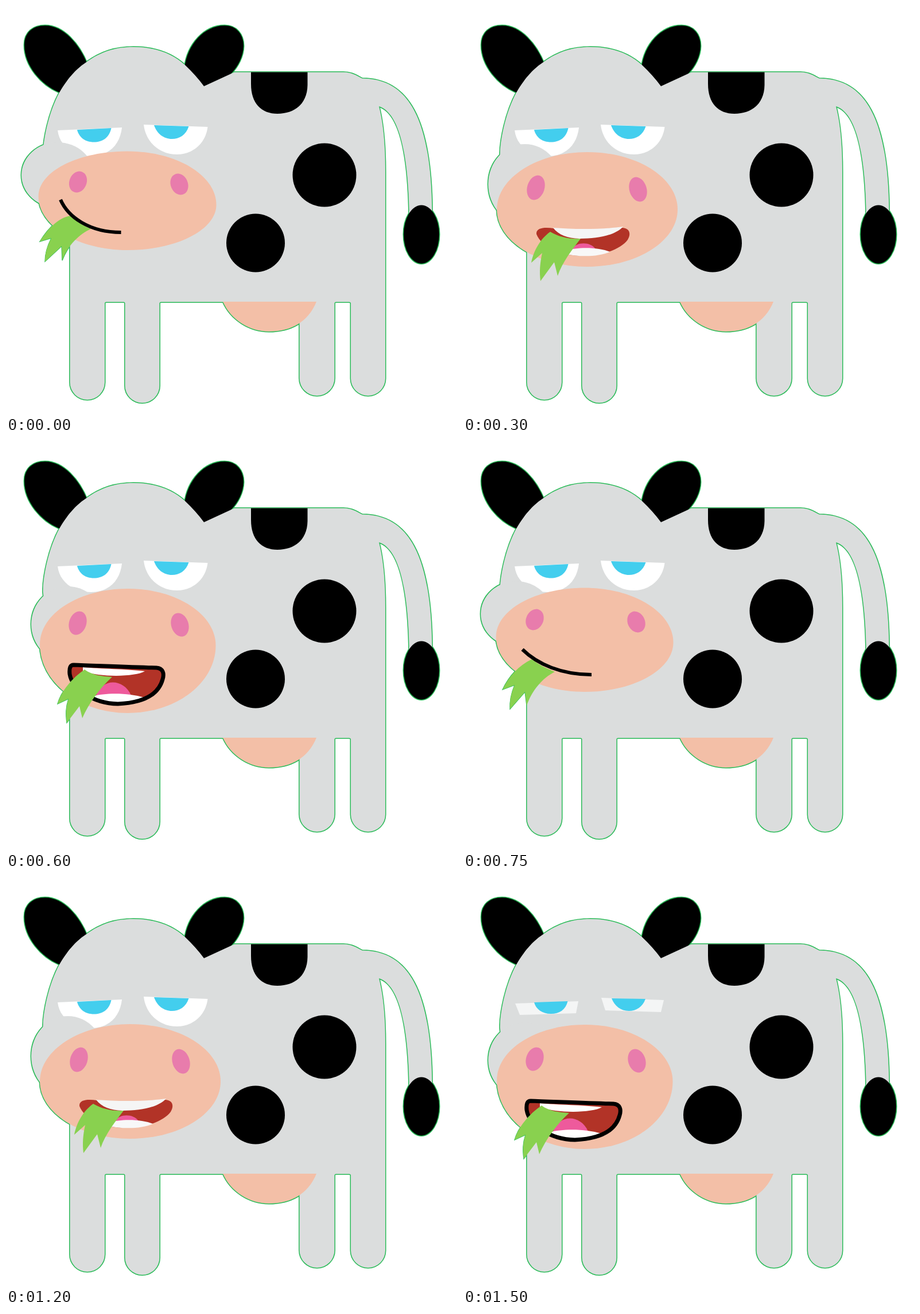
These frames come from a looping animation (786 by 712 pixels, 1.65 s). An HTML page:

```html
<!DOCTYPE html>
<html lang="en">
<head>
<meta charset="utf-8">
<title>Chewing cow</title>
<style>
  html, body { margin: 0; width: 100%; height: 100%; overflow: hidden; background: #fff; }
  svg { display: block; width: 786px; height: 712px; }
</style>
</head>
<body>
<svg id="stage" viewBox="0 0 786 712" xmlns="http://www.w3.org/2000/svg"></svg>
<script>
const GREY = '#dbdddd', PEACH = '#f3bfa7', PINK = '#e87cac', BLUE = '#43ceee',
      RED = '#b23327', LEAF = '#89d14f', EDGE = '#2abb58', TONGUE = '#ee5a9c';
const STEP = 150, LOOP = 1650;

const path = (d, fill) => `<path d="${d}" fill="${fill}"/>`;
const oval = (x, y, rx, ry, fill, turn = 0) =>
  `<ellipse cx="${x}" cy="${y}" rx="${rx}" ry="${ry}" fill="${fill}" transform="rotate(${turn} ${x} ${y})"/>`;
const leg = (l, r, bottom) => {
  const rad = (r - l) / 2;
  return `V${bottom - rad} A${rad},${rad} 0 0 1 ${l},${bottom - rad}`;
};

const ears =
  path('M93,151 C62,138 32,105 32,68 C32,45 48,34 68,34 C100,34 128,66 142,102 L130,140Z', '#000') +
  path('M311,108 C316,66 346,34 381,34 C402,34 414,50 414,70 C413,106 378,142 343,140Z', '#000');

const torso = path(
  'M64.5,262 C64,236 74,186 93,151 C110,122 125,108 140,98 C165,80 190,71.5 222,71.5 ' +
  'C260,71.5 290,83 312,103 C325,115 336,128 345,140 L398,115.5 H588 C602,115.5 610,121 621,126.5 ' +
  'C701,127 741,196 742.5,358 V370 H702.5 V355 C700,252 684,186 650,175 C658,207 661,242 661,290 ' +
  leg(601, 661, 680) + ' V519 Q601,516.5 598,516.5 H575 Q572.5,516.5 572.5,519 ' +
  leg(511.5, 572.5, 680) + ' V516.5 H270 Q267.5,516.5 267.5,519 ' +
  leg(207.5, 267.5, 692.5) + ' V519 Q207.5,516.5 205,516.5 H174.5 Q172,516.5 172,519 ' +
  leg(111.5, 172, 687) + ' V390 L75,345Z', GREY);

const udder = path('M378,516 C392,548 425,568 458,568 C495,568 526,553 541,516Z', PEACH);
const tuft = oval(724, 398.5, 31, 51, '#000');
const spots =
  path('M427,115.5 H525.5 V138 C525,169 505,188 473,188 C445,188 427,170 427,136Z', '#000') +
  oval(555, 295, 55.5, 55.5, '#000') + oval(435, 413.5, 51, 51, '#000');

const openEyes =
  path('M90,217 L202,212 C199,241 180,262 148,262 C116,262 93,243 90,217Z', '#fff') +
  path('M240,207 L351.5,211 C348,240 325,259 298,259 C265,259 243,235 240,207Z', '#fff') +
  path('M124,216 L183.5,213 C180,230 168,237.5 153,237.5 C138,237.5 127,229 124,216Z', BLUE) +
  path('M258,208 L318.5,210 C314,225 302,232 289,232 C275,232 263,223 258,208Z', BLUE);
const halfEyes =
  path('M91,219 L201,215 L197,236 L99,239Z', '#f4f5f5') +
  path('M241,209 L350,213 L345,234 L248,231Z', '#f4f5f5') +
  path('M124,217 L182.5,215 C179,230 168,237 153,237 C138,237 127,229 124,217Z', BLUE) +
  path('M259,210 L318,211 C313,225 302,232 289,232 C275,232 264,223 259,210Z', BLUE);

// Rounded muzzle with separate heights for its left and right extremes.
function muzzle([l, r, top, bottom, ly, ry]) {
  const m = (l + r) / 2, k = (r - l) * 0.276, q = 0.448;
  const mix = y => [top + (y - top) * q, bottom + (y - bottom) * q];
  const [lt, lb] = mix(ly), [rt, rb] = mix(ry);
  return path(`M${l},${ly} C${l},${lt} ${m - k},${top} ${m},${top} C${m + k},${top} ${r},${rt} ${r},${ry} ` +
    `C${r},${rb} ${m + k},${bottom} ${m},${bottom} C${m - k},${bottom} ${l},${lb} ${l},${ly}Z`, PEACH);
}

const line = d => `<path d="${d}" fill="none" stroke="#000" stroke-width="6"/>`;

const smile = {
  cheek: [90, 295, 63, 57], muzzle: [56.5, 366.5, 253.5, 426, 332, 347],
  nose: [125.5, 307, 302, 311, 15, 19, 22], lineOnTop: true,
  mouth: line('M95,338 C108,368 145,395 200.5,395'),
  grass: 'M112,366 C90,370 72,390 59,411 L79,405 C71,421 68,432 68,446 L97,419 L98,444 C108,417 128,398 148,389 C134,383 121,375 112,366Z'
};
const grin = {
  cheek: [93, 300, 62, 57], muzzle: [57.5, 366.5, 254.5, 436, 340, 350],
  nose: [125, 310, 302, 314, 15, 19, 24], lineOnTop: true,
  mouth: line('M103.5,362 C130,388 172,406 224,406'),
  grass: 'M120,379 C97,390 80,409 69,432 L90,424 C84,439 81,451 82,466 L108,436 L111,460 C120,434 138,412 160,401 C145,395 131,388 120,379Z'
};
const part = {
  cheek: [104, 298, 63, 57], muzzle: [59, 374, 256, 427, 341, 341],
  nose: [127, 309, 305, 311, 15.5, 18.5, 22],
  mouth: path('M142,381 L150,385 C190,387 245,387 285,384 C260,402 235,410 210,410 C180,409 153,399 142,381Z', RED),
  grass: 'M157,385 C143,394 134,408 130,426 L148,414 C145,430 144,444 147,459 L171,425 L175,448 C181,426 194,404 205,387 C188,385 170,385 157,385Z'
};
const teeth = {
  cheek: [108, 311, 64, 70], muzzle: [59, 374, 255, 455, 355, 355],
  nose: [127, 317, 305, 320, 15, 22, 17],
  mouth:
    path('M128,398 C127,386 144,386 158,388 C200,391 250,391 278,387 C291,388 293,398 287,408 C275,424 245,436 207,436 C172,436 136,420 128,398Z', RED) +
    path('M157,387 C195,390 245,390 279,385 C266,400 235,406 203,406 C182,405 167,400 157,387Z', '#f5f5f5') +
    path('M190,424 C198,411 222,411 231,424Z', TONGUE) +
    path('M180,427 C200,420 237,421 256,429 C237,438 202,438 180,433Z', '#f8f8f8'),
  grass: 'M152,394 C135,406 123,427 119,448 L138,431 C134,449 133,464 135,480 L159,447 L165,471 C173,447 191,424 205,406 C185,407 167,403 152,394Z'
};
const wide = {
  cheek: [108, 315, 64, 68], muzzle: [59, 370, 255.5, 466, 354, 355],
  nose: [126, 317, 304, 320, 15, 21.5, 17],
  mouth:
    path('M118,398 C117,386 132,387 146,389 C185,393 235,393 270,390 C284,391 286,401 281,412 C270,437 240,449 201,449 C160,449 124,427 118,398Z', RED) +
    path('M145,388 C185,392 230,392 262,391 C248,403 220,408 186,408 C167,407 153,402 145,388Z', '#f7f7f7') +
    path('M172,435 C180,413 214,413 225,435Z', TONGUE) +
    path('M165,437 C188,429 230,430 250,437 C225,450 188,449 165,437Z', '#fafafa'),
  grass: 'M145,396 C125,410 109,431 104,453 L123,439 C120,456 119,469 121,485 L143,454 L149,476 C159,453 178,427 195,408 C177,408 159,405 145,396Z'
};
const yawn = {
  cheek: [108, 318, 64, 66], muzzle: [59, 365.5, 256, 473, 353, 355],
  nose: [125, 316, 303, 319, 15, 21, 18],
  mouth:
    path('M118,389 C150,390 220,393 262,394 C274,395 276,404 273,414 C266,440 240,455 195,457 C150,456 115,430 111,405 C110,394 112,389 118,389Z', RED) +
    path('M134,393 C165,396 210,396 242,400 C225,410 165,411 134,400Z', '#fff') +
    path('M157,442 C167,412 205,412 218,442Z', TONGUE) +
    path('M150,444 C175,437 215,438 241,446 C215,458 172,457 150,448Z', '#fff') +
    '<path d="M118,389 C150,390 220,393 262,394 C274,395 276,404 273,414 C266,440 240,455 195,457 C150,456 115,430 111,405 C110,394 112,389 118,389Z" fill="none" stroke="#000" stroke-width="7"/>',
  grass: 'M137,397 C115,412 96,435 90,457 L109,448 C104,464 104,475 106,490 L128,461 L133,482 C144,456 164,429 185,410 C168,409 150,407 137,397Z'
};

const poses = [smile, part, teeth, wide, yawn, grin, smile, part, teeth, wide, yawn];

function draw(slot) {
  const p = poses[slot];
  const cheek = oval(...p.cheek, GREY), snout = muzzle(p.muzzle), grass = path(p.grass, LEAF);
  const [lx, ly, rx, ry, w, h, turn] = p.nose;
  const nose = oval(lx, ly, w, h, PINK, turn) + oval(rx, ry, w, h, PINK, -turn);
  const rim = `<g stroke="${EDGE}" stroke-width="3" stroke-linejoin="round">` +
    ears + torso + udder + tuft + cheek + snout + '</g>' +
    `<g stroke="${EDGE}" stroke-width="1.4">${grass}</g>`;
  const eyes = slot === 10 ? halfEyes : openEyes;
  const bite = p.lineOnTop ? grass + p.mouth : p.mouth + grass;
  return rim + ears + torso + udder + tuft + spots + eyes + cheek + snout + nose + bite;
}

const stage = document.getElementById('stage');
const start = performance.now();
let shown = -1;
function tick(now) {
  const slot = Math.floor((Math.max(0, now - start) % LOOP) / STEP);
  if (slot !== shown) stage.innerHTML = draw(shown = slot);
  requestAnimationFrame(tick);
}
tick(start);
</script>
</body>
</html>
```
